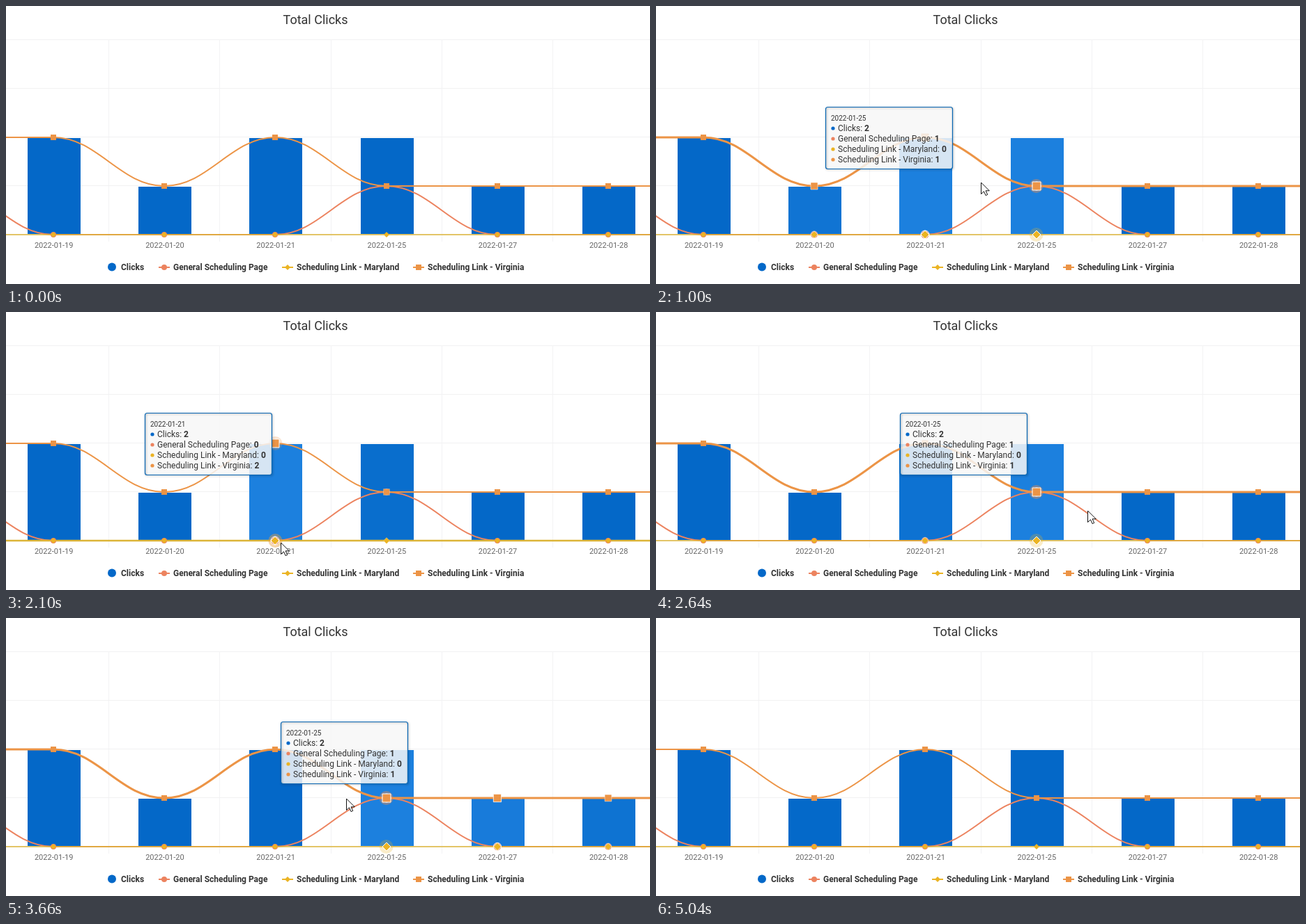
An HTML page with a canvas for the animation above (5.12 s loop, 924 by 400 pixels).

```html
<!DOCTYPE html>
<html lang="en">
<head>
<meta charset="utf-8">
<title>Total Clicks</title>
<style>
html, body { margin: 0; width: 100%; height: 100%; overflow: hidden; background: #fff; }
canvas { display: block; }
</style>
</head>
<body>
<canvas id="stage" width="924" height="400"></canvas>
<script>
const ctx = document.getElementById('stage').getContext('2d');
const LOOP = 5120, LEAVE = 4640, TICK = 32, FADE = 450;
const BLUE = '#0468c8', CORAL = '#ec835f', YELLOW = '#ebb424', ORANGE = '#ec9446';
const dates = ['19', '20', '21', '25', '27', '28'].map(d => '2022-01-' + d);
const clicks = [2, 1, 2, 2, 1, 1];
const general = [0, 0, 0, 1, 0, 0];
const maryland = [0, 0, 0, 0, 0, 0];
const virginia = [2, 1, 2, 1, 1, 1];
const names = ['Clicks', 'General Scheduling Page', 'Scheduling Link - Maryland', 'Scheduling Link - Virginia'];
const series = [clicks, general, maryland, virginia];
const colors = [BLUE, CORAL, YELLOW, ORANGE];

// Pointer path: time, x, y
const path = [
  [345, 95, 400], [365, 122, 328], [390, 148, 295], [620, 230, 257], [780, 307, 256],
  [1000, 466, 254], [1400, 560, 253], [1440, 560, 253], [1790, 466, 300], [1960, 394, 332],
  [2240, 394, 332], [2390, 466, 318], [2650, 625, 285], [2910, 784, 266], [3120, 859, 262],
  [3320, 862, 262], [3420, 784, 262], [3540, 625, 261], [3680, 466, 260], [4005, 306, 259],
  [4120, 267, 258], [4340, 222, 262], [4540, 222, 262], [LEAVE, 220, 329], [4740, 215, 400]
];
// Hovered column changes: time, column
const visits = [
  [365, 0], [390, 1], [780, 2], [1000, 3], [1790, 2], [2390, 3],
  [2650, 4], [2910, 5], [3420, 4], [3540, 3], [3680, 2], [4005, 1]
];

const colX = i => 68 + 159.2 * i;
const valY = v => 329 - 70 * v;
const clamp = v => Math.max(0, Math.min(1, v));
const within = (t, a, b) => t >= a && t < b;

function text(str, x, y, font, color = '#333', align = 'left') {
  ctx.font = font + ' Roboto, sans-serif';
  ctx.fillStyle = color;
  ctx.textAlign = align;
  ctx.fillText(str, x, y);
}

function line(x1, y1, x2, y2, color, width) {
  ctx.strokeStyle = color;
  ctx.lineWidth = width;
  ctx.beginPath();
  ctx.moveTo(x1, y1);
  ctx.lineTo(x2, y2);
  ctx.stroke();
}

function disc(x, y, r, color) {
  ctx.fillStyle = color;
  ctx.beginPath();
  ctx.arc(x, y, r, 0, 7);
  ctx.fill();
}

function spline(values, before, color, width) {
  const points = [before, ...values, values[5]];
  ctx.strokeStyle = color;
  ctx.lineWidth = width;
  ctx.beginPath();
  points.forEach((v, k) => {
    const x = colX(k - 1), y = valY(v);
    if (!k) return ctx.moveTo(x, y);
    ctx.bezierCurveTo(x - 95.5, valY(points[k - 1]), x - 63.7, y, x, y);
  });
  ctx.stroke();
}

function marker(kind, x, y, r, color, lit = 0) {
  ctx.beginPath();
  if (kind === 1) ctx.arc(x, y, r, 0, 7);
  else if (kind === 2) {
    ctx.moveTo(x, y - r);
    ctx.lineTo(x + r, y);
    ctx.lineTo(x, y + r);
    ctx.lineTo(x - r, y);
    ctx.closePath();
  } else ctx.rect(x - r, y - r, 2 * r, 2 * r);
  ctx.fillStyle = color;
  ctx.fill();
  if (lit > 0) {
    ctx.strokeStyle = `rgba(255,255,255,${lit})`;
    ctx.lineWidth = 1;
    ctx.stroke();
  }
}

function hoveredColumn(t) {
  if (t >= LEAVE) return -1;
  return visits.reduce((col, v) => t >= v[0] ? v[1] : col, -1);
}

function highlight(col, t) {
  let lit = 0;
  visits.forEach(([start, c], k) => {
    if (c !== col || t < start) return;
    const end = k + 1 < visits.length ? visits[k + 1][0] : LEAVE;
    lit = Math.max(lit, (1 + Math.cos(Math.PI * clamp((t - end) / FADE))) / 2);
  });
  return lit;
}

// The box closes a fixed share of the remaining distance on every tick.
function tooltipPlace(t) {
  let x, y, col = -1;
  visits.forEach(([start, c], k) => {
    if (t < start) return;
    const tx = c ? Math.round(colX(c)) - 190 : 75, ty = valY(clicks[c]) - 44;
    const end = Math.min(t, k + 1 < visits.length ? visits[k + 1][0] : LOOP);
    const n = Math.floor((end - start) / TICK) + 1;
    x = col < 0 ? tx : tx + (x - tx) * (2 / 3) ** n;
    y = col < 0 ? ty : ty + (y - ty) * 0.5 ** n;
    col = c;
  });
  return { x: Math.round(x), y: Math.round(y), col };
}

function drawTooltip(t) {
  const { x, y, col } = tooltipPlace(t);
  const alpha = 1 - clamp((t - 4800) / 200);
  if (col < 0 || !alpha) return;
  ctx.globalAlpha = alpha;
  ctx.beginPath();
  ctx.roundRect(x + 0.5, y + 0.5, 182, 89, 3);
  ctx.fillStyle = 'rgba(247,247,247,.85)';
  ctx.fill();
  ctx.save();
  ctx.shadowColor = 'rgba(0,0,0,.35)';
  ctx.shadowBlur = 3;
  ctx.shadowOffsetX = ctx.shadowOffsetY = 1;
  ctx.strokeStyle = '#0766b4';
  ctx.lineWidth = 1.2;
  ctx.stroke();
  ctx.restore();
  text(dates[col], x + 8, y + 20, '10px');
  names.forEach((name, k) => {
    const base = y + 35 + 15 * k, label = name + ': ';
    disc(x + 11, base - 4, 2.6, colors[k]);
    text(label, x + 18, base, '12px');
    text(series[k][col], x + 18 + ctx.measureText(label).width, base, 'bold 12px');
  });
  ctx.globalAlpha = 1;
}

function drawPointer(t) {
  const k = path.findIndex(p => p[0] > t);
  if (k < 1) return;
  const [t0, x0, y0] = path[k - 1], [t1, x1, y1] = path[k];
  const p = (t - t0) / (t1 - t0);
  ctx.save();
  ctx.translate(Math.round(x0 + (x1 - x0) * p) + 0.5, Math.round(y0 + (y1 - y0) * p));
  ctx.fillStyle = '#fff';
  ctx.strokeStyle = '#111';
  ctx.lineWidth = 1;
  const arrow = new Path2D('M0 0V16.5L4 12.8L6.6 18.6L9.2 17.4L6.6 11.8H11.8Z');
  ctx.fill(arrow);
  ctx.stroke(arrow);
  ctx.restore();
}

function drawLegend() {
  disc(152, 375.5, 6, BLUE);
  [165, 240, 417, 605].forEach((x, k) => {
    if (k) {
      line(x - 21, 376, x - 5, 376, colors[k], 2);
      marker(k, x - 13, 376, 4, colors[k]);
    }
    text(names[k], x, 380, 'bold 12px');
  });
}

function draw(t) {
  ctx.fillStyle = '#fff';
  ctx.fillRect(0, 0, 924, 400);
  text('Total Clicks', 444, 26, '18px', '#333', 'center');
  for (let i = 0; i < 5; i++) {
    const x = Math.floor(colX(i + 0.5)) + 0.5, y = 48.5 + 70 * i;
    line(0, y, 924, y, '#f1f1f2', 1);
    line(x, 48, x, 339, '#f3f3f4', 1);
  }

  const hover = hoveredColumn(t);
  const lit = clicks.map((_, i) => highlight(i, t));
  clicks.forEach((v, i) => {
    const x = Math.round(colX(i)) - 37, top = valY(v) + 1;
    ctx.fillStyle = BLUE;
    ctx.fillRect(x, top, 76, 328 - top);
    ctx.fillStyle = `rgba(28,128,222,${lit[i]})`;
    ctx.fillRect(x, top, 76, 328 - top);
    text(dates[i], colX(i) + 0.7, 348, '11px', '#666', 'center');
  });

  const virginiaHot = within(t, 390, 1700) || within(t, 2400, LEAVE);
  const marylandHot = within(t, 1900, 2300);
  const before = [0, 1, 0, 2], widths = [0, 2, marylandHot ? 2.4 : 1.5, virginiaHot ? 3 : 2];
  for (let k = 1; k < 4; k++) {
    spline(series[k], before[k], k === 2 ? '#dcb437' : colors[k], widths[k]);
  }
  if (hover >= 0) {
    for (let k = 1; k < 4; k++) {
      ctx.globalAlpha = 0.25;
      disc(colX(hover), valY(series[k][hover]), 10, colors[k]);
      ctx.globalAlpha = 1;
    }
  }
  for (let k = 1; k < 4; k++) {
    series[k].forEach((v, i) => {
      marker(k, Math.round(colX(i)), valY(v), 4 + 2 * lit[i], colors[k], lit[i]);
    });
  }
  drawLegend();
  drawTooltip(t);
  drawPointer(t);
}

function frame() {
  draw(performance.now() % LOOP);
  requestAnimationFrame(frame);
}
frame();
</script>
</body>
</html>
```
